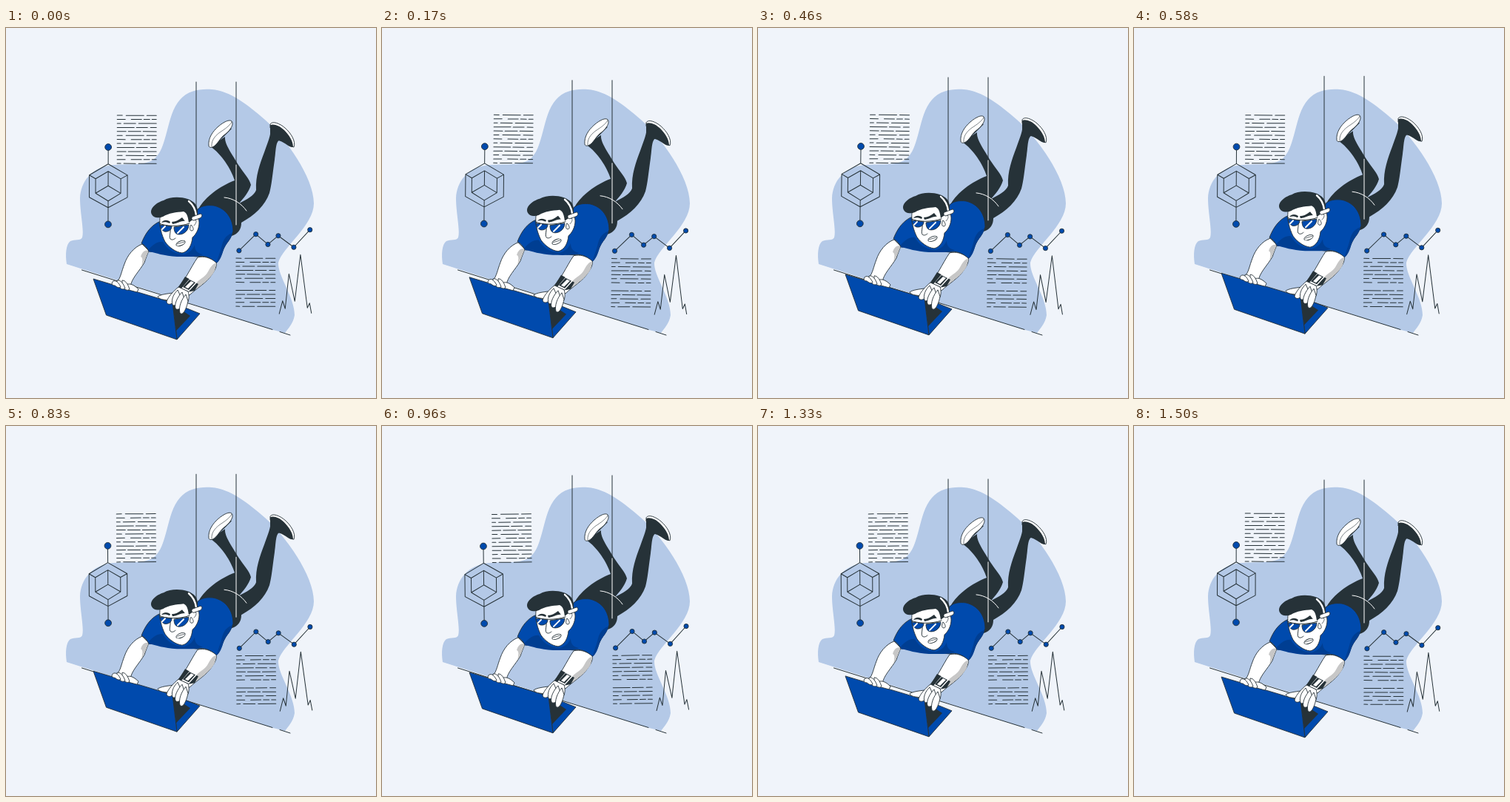
An HTML page that plays this animation: 500 by 500 pixels, repeating every 1540 ms.

```html
<!DOCTYPE html>
<html lang="en">
<head>
<meta charset="utf-8">
<title>Hanging hacker</title>
<style>
html, body { margin: 0; width: 100%; height: 100%; overflow: hidden; background: #f0f4fa; }
svg { display: block; width: 100vw; height: 100vh; }
.line { fill: none; stroke: #263238; stroke-width: 1; stroke-linejoin: round; stroke-linecap: round; }
.blue { fill: #004aad; }
.dark { fill: #263238; }
.skin { fill: #fff; }
.edge { stroke: #263238; stroke-width: .9; stroke-linejoin: round; }
.shade { fill: #c7c7c7; }
.deep { fill: #003e92; }
.light { fill: none; stroke: #fff; stroke-width: 1; stroke-linecap: round; }
</style>
</head>
<body>
<svg viewBox="0 0 500 500">
  <path fill="#b4c9e7" d="M82 319C80 306 81 292 87 288C93 285 101 288 103 283C106 275 100 250 100 230C101 207 116 190 138 186C159 182 184 188 199 178C219 164 216 118 235 97C246 84 263 82 278 83C303 85 327 104 350 124C378 149 416 202 416 237C416 267 373 297 368 317C367 335 390 364 390 388C388 400 381 406 377 412L361 408Z"/>
  <path class="line" d="M102.500 327L360 407.500M370 410.500L384 415"/>

  <g id="charts">
    <g id="notes"></g>
    <path class="line" d="M138 161V184M138 243V265.500M138 184L164 199V229L138 243L112.500 229V199ZM138 194L155 204V223.500L138 234L121 223.500V204ZM138 194V213.500L121 223.500M138 213.500L155 223.500M112.500 199L121 204M164 199L155 204M138 243V234"/>
    <path class="line" d="M369.500 386L374 368.500L377.500 379L382.500 332L390.500 369L398 306L407.500 378L410.500 371.500L413 385"/>
    <g id="graph"></g>
  </g>

  <g id="man">
    <path class="line" d="M257 73V246M311 73V190"/>

    <!-- legs -->
    <path class="dark" d="M261 243C269 229 288 214 309 206C304 190 291 170 276 160L296 147C295 157 306 171 314 185C322 197 329 204 331 212C328 222 321 230 315 237C325 232 336 226 338 219C337 200 343 184 349 168C354 154 358 145 358 134L371 151C364 152 365 166 363 178C360 199 359 212 356 223C350 240 336 253 318 263C318 272 314 278 305 281L280 260Z"/>
    <path class="dark" d="M280 160L294 147L305 136L291 132L277 148Z"/>
    <path class="skin edge" d="M274 159C273 149 279 140 287 133C294 127 302 123 305 126C308 130 304 137 297 143C289 148 286 158 279 161C276 162 274 161 274 159Z"/>
    <path class="line" style="stroke-width:.6" d="M278 160C277 151 284 144 292 139C298 135 303 131 305 127"/>
    <path class="skin edge" d="M357 130C360 125 370 129 377 135C385 142 392 153 389 161L383 159L357 135Z"/>
    <path class="dark" d="M357 131C362 129 370 132 376 138C383 145 388 153 388 161C382 162 374 151 366 152L357 143Z"/>
    <path class="light" d="M295 229C307 230 318 237 325 247"/>
    <path class="light" d="M311 185V266"/>

    <!-- far arm -->
    <path class="skin edge" d="M184 292C173 296 164 307 160 319C156 329 155 338 150 343L157 351L168 350C169 339 180 329 187 317C189 311 191 306 193 301Z"/>
    <path class="shade" d="M193 301C187 299 184 303 182 309C185 310 185 315 183 322C188 315 190 307 193 301Z"/>

    <!-- shirt -->
    <path class="blue edge" d="M209 261C196 266 188 278 183 291C187 293 191 297 193 302C197 303 199 301 203 302C220 309 242 307 259 309C267 307 277 310 284 318C291 311 292 299 299 290C304 284 304 281 307 275C307 258 298 244 281 240C272 239 264 240 259 245L248 278Z"/>
    <path class="deep" d="M193 299C199 292 206 288 212 289C217 298 225 305 240 306C249 304 253 298 255 293C255 302 260 305 266 306C259 310 244 309 231 309C213 308 203 304 193 302Z"/>
    <path class="deep" d="M306 277C296 280 293 288 291 297C289 304 287 309 284 318C289 315 292 307 294 299C298 290 305 284 306 277Z"/>

    <!-- laptop -->
    <path class="blue edge" d="M225 371L262 386L231 421Z"/>
    <path class="dark" d="M225 373L249 389L230 409Z"/>
    <path class="blue edge" d="M118 339L225 371L231 421L135.500 388Z"/>

    <!-- near arm -->
    <path class="skin edge" d="M259 310C254 317 250 325 244 335C239 343 234 349 229 355L248 361C257 352 272 344 279 332C284 325 285 320 284 317C276 310 267 308 259 310Z"/>
    <path class="shade" d="M284 318C279 318 276 324 272 331C267 338 260 340 257 345L256 353C267 345 278 337 282 328Z"/>
    <path class="dark" d="M242 336L260 346L255 355L234 359L232 352Z"/>
    <path class="skin" d="M248 339L258 344L247 356L237 352Z"/>
    <path class="dark" d="M248 340L256 344L247 354L239 350Z"/>
    <path class="skin" d="M250 342L254 344L246 352L242 350Z"/>

    <!-- hands -->
    <g class="skin edge">
      <path d="M162 347C168 344 174 348 179 353L177 357L162 353Z"/>
      <path d="M157 341C162 341 165 347 167 353C164 356 160 353 157 350Z"/>
      <path d="M150 341C155 340 159 346 161 352C157 355 153 351 150 346Z"/>
      <path d="M144 343C148 339 153 345 155 350C152 352 150 350 147 348C144 348 142 346 144 343Z"/>
      <path d="M226 358C218 359 209 360 205 363C207 367 213 367 219 368L229 369Z"/>
      <path d="M233 350C227 355 219 363 217 370C218 375 224 374 227 369L246 370C248 364 247 359 246 356Z"/>
      <path d="M232 354C226 360 223 367 225 374C229 377 232 372 237 365Z"/>
      <path d="M238 357C232 363 227 373 229 379C233 383 237 377 242 369Z"/>
      <path d="M243 360C237 367 233 377 235 385C239 390 244 379 246 369Z"/>
    </g>

    <!-- head -->
    <path class="skin edge" d="M208 256C207 268 210 279 215 289C220 296 229 303 238 304C247 302 251 293 252 283C257 279 261 271 261 263C261 255 256 253 251 258L243 246L220 249Z"/>
    <path class="dark" d="M197 252C193 244 203 236 213 233C225 226 248 228 256 238C260 243 260 254 256 260C253 257 250 261 247 263C246 256 245 250 240 248C230 249 220 250 212 255C205 257 200 257 197 252Z"/>
    <path class="line" style="stroke-width:4" d="M247 234C253 239 256 245 257 253"/>
    <path class="light" style="stroke-width:2.400" d="M247 234C253 239 256 245 257 253"/>
    <path class="skin edge" d="M252 255L263 251C266 252 265 256 262 257L254 260C251 260 250 257 252 255Z"/>
    <path class="dark" d="M210 263C213 259 218 259 222 262L221 264C217 262 214 262 210 263ZM224 262C229 262 234 259 238 256L242 261C238 260 232 264 225 265Z"/>
    <path class="line" d="M207 264C215 268 234 269 248 264M222 269C223 276 220 282 222 285C224 287 227 286 229 284"/>
    <path class="blue edge" d="M208 266L224 268C224 273 219 276 214 275C210 273 208 270 208 266ZM227 269L247 266C247 273 241 279 234 279C229 279 227 275 227 269Z"/>
    <path class="light" style="stroke-width:2" d="M215 268L211 272M240 269L232 277"/>
    <path class="skin edge" d="M250 266C248 270 248 274 251 274C254 274 254 270 250 266Z"/>
    <ellipse class="skin edge" cx="236" cy="291" rx="6.500" ry="3" transform="rotate(-22 236 291)"/>
    <path class="line" style="stroke-width:.7" d="M231 292L241 289M254 267C257 264 258 261 256 259"/>
  </g>
</svg>
<script>
const $ = id => document.getElementById(id);
const addPath = (box, d) => box.insertAdjacentHTML('beforeend', `<path class="line" d="${d}"/>`);
const addDot = (box, [x, y], r) =>
  box.insertAdjacentHTML('beforeend', `<circle class="blue edge" cx="${x}" cy="${y}" r="${r}"/>`);

// Dash ends, cycled row by row, within a block 53 wide
const rows = [
  [[0, 7], [12, 36], [40, 53]],
  [[0, 11], [19, 33], [36, 44], [47, 53]],
  [[0, 5], [9, 25], [29, 53]],
  [[0, 23], [26, 41], [45, 53]],
  [[0, 12], [15, 32], [35, 53]]
];

function addNotes(x, y, skip) {
  let d = '';
  for (let i = 0; i < 13; i++) {
    if (i === skip) continue;
    for (const [a, b] of rows[i % rows.length])
      d += `M${x + a} ${(y + i * 5.42).toFixed(1)}H${x + b}`;
  }
  addPath($('notes'), d);
}

addNotes(150, 118.3, -1);
addNotes(311, 311, 7);

const points = [[315, 300.7], [337.7, 278.5], [354, 292.2], [368, 280.5], [389, 296], [410.8, 272.4]];
addPath($('graph'), 'M' + points.join('L'));
points.forEach(p => addDot($('graph'), p, 3.1));
[[138, 161.2], [138, 265.6]].forEach(p => addDot($('charts'), p, 4.4));

const LOOP = 1540, FPS = 24, CYCLE = 36;
// Triangle wave: 0 at whole turns, 1 at half turns
const tri = p => 1 - Math.abs(1 - 2 * (p - Math.floor(p)));

function draw(ms) {
  const step = Math.floor(ms % LOOP * FPS / 1000 + .1);
  const phase = (step + 1) / CYCLE;
  const lift = 10 * tri(phase);
  const tilt = 2 * tri(phase + .25) - 1;
  $('man').setAttribute('transform', `translate(0 ${(.55 - lift).toFixed(3)})`);
  $('charts').setAttribute('transform', `rotate(${tilt.toFixed(3)} 250 250)`);
}

const start = performance.now();
function tick() {
  draw(performance.now() - start);
  requestAnimationFrame(tick);
}
tick();
</script>
</body>
</html>
```
